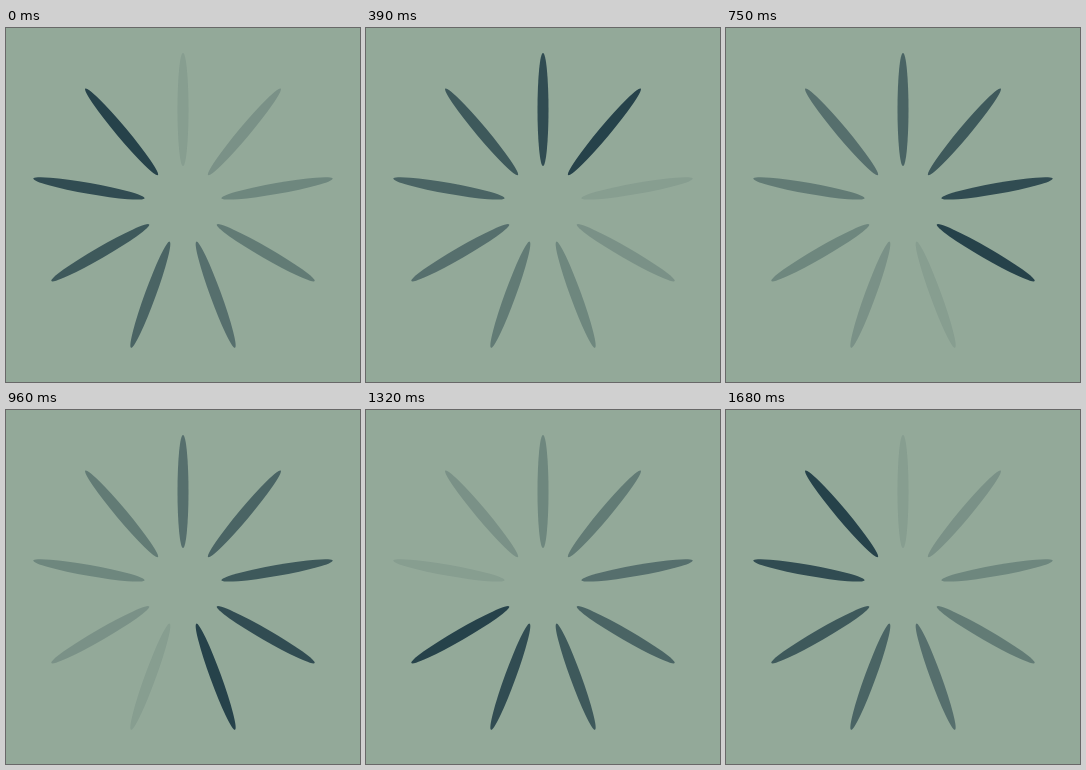
An HTML page that plays this animation: 354x354 px, repeating every 1.71 s.

```html
<!DOCTYPE html>
<html lang="en">
<head>
<meta charset="utf-8">
<title>Spinner</title>
<style>
  html, body { margin: 0; height: 100%; overflow: hidden; background: #93a999; }
  svg { display: block; width: 100%; height: 100%; }
</style>
</head>
<body>
<svg viewBox="0 0 354 354" fill="#26424a"></svg>
<script>
const COUNT = 9;
const LOOP = 1710;
// Moment at which each spoke becomes the darkest one.
const STEPS = [210, 390, 570, 750, 930, 1140, 1320, 1500, 1680];

const svg = document.querySelector('svg');
const spokes = STEPS.map((_, i) => {
  const spoke = document.createElementNS(svg.namespaceURI, 'ellipse');
  const attributes = {
    cx: 177, cy: 81.5, rx: 5.5, ry: 56.5,
    transform: `rotate(${i * 360 / COUNT} 177 177)`
  };
  for (const name in attributes) spoke.setAttribute(name, attributes[name]);
  return svg.appendChild(spoke);
});

function draw(now) {
  const time = now % LOOP;
  const passed = STEPS.filter(step => step <= time).length;
  const head = (passed + COUNT - 1) % COUNT;
  spokes.forEach((spoke, i) => {
    const age = (head - i + COUNT) % COUNT;
    spoke.setAttribute('opacity', (COUNT - age) / COUNT);
  });
}

const start = performance.now();
function tick() {
  draw(performance.now() - start);
  requestAnimationFrame(tick);
}
tick();
</script>
</body>
</html>
```
